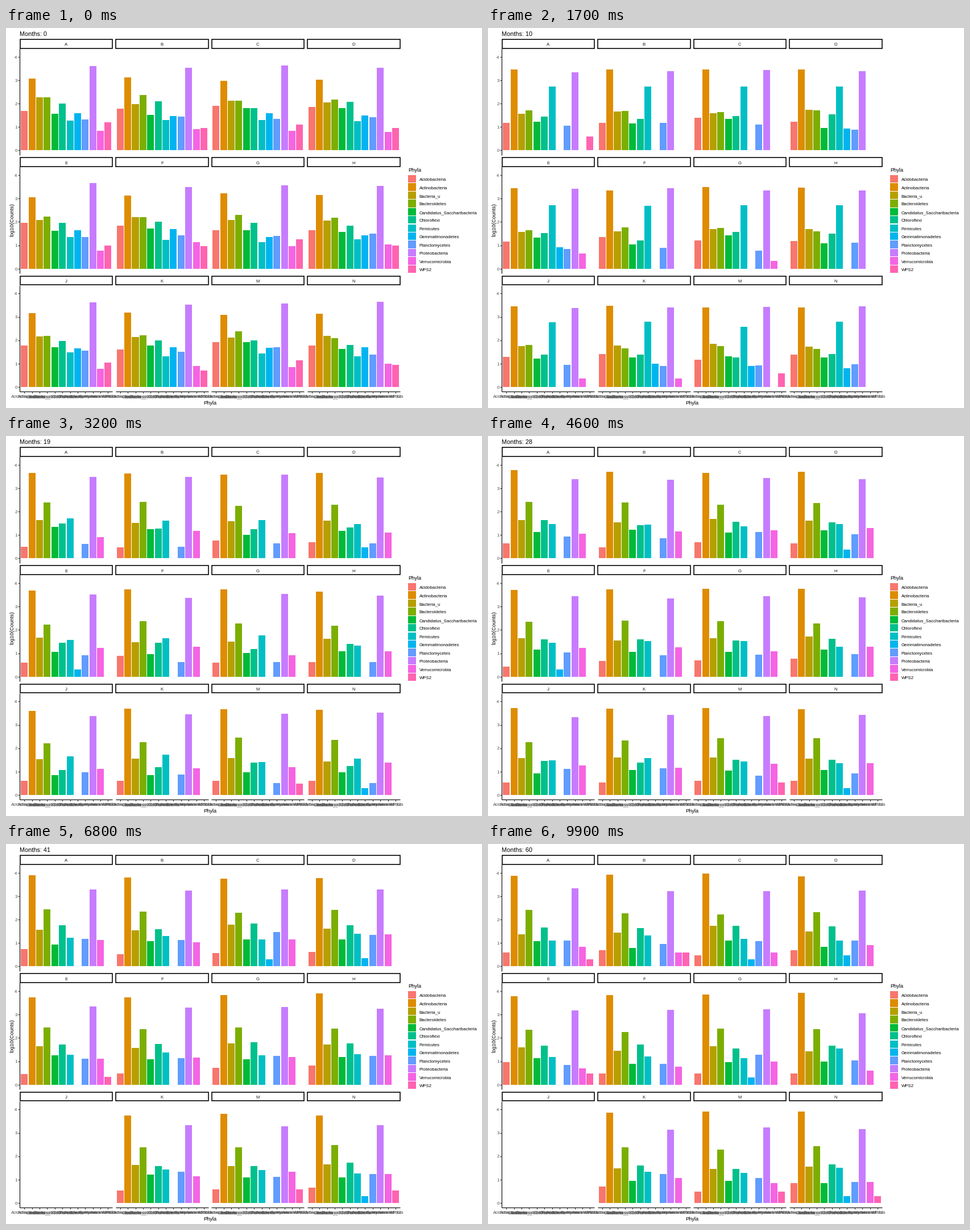
A matplotlib script for the animation above (10 s loop, 837x669 px).

```python
import matplotlib.pyplot as plt
import numpy as np
from matplotlib.animation import FuncAnimation
from matplotlib.patches import Rectangle

W, H, DPI = 837, 669, 64
FRAMES, LAST_MONTH = 100, 60
PANELS = "ABCDEFGHJKMN"
MONTHS = (0, 10, 19, 36, 60)

# Phylum: colour, then its typical log10 count at each of MONTHS
PHYLA = {
    "Acidobacteria": ("#F8766D", 1.75, 1.24, 0.60, 0.55, 0.58),
    "Actinobacteria": ("#DE8C00", 3.09, 3.45, 3.68, 3.78, 3.85),
    "Bacteria_u": ("#B79F00", 2.12, 1.65, 1.55, 1.70, 1.55),
    "Bacteroidetes": ("#7CAE00", 2.20, 1.68, 2.33, 2.40, 2.33),
    "Candidatus_Saccharibacteria": ("#00BA38", 1.72, 1.22, 1.09, 1.12, 0.96),
    "Chloroflexi": ("#00C08B", 1.99, 1.38, 1.30, 1.77, 1.66),
    "Firmicutes": ("#00BFC4", 1.35, 2.75, 1.57, 1.30, 1.35),
    "Gemmatimonadetes": ("#00B4F0", 1.56, 0.95, 0.15, 0.00, 0.05),
    "Planctomycetes": ("#619CFF", 1.50, 0.95, 0.64, 1.34, 1.10),
    "Proteobacteria": ("#C77CFF", 3.58, 3.37, 3.49, 3.34, 3.20),
    "Verrucomicrobia": ("#F564E3", 0.83, 0.20, 1.18, 1.27, 0.75),
    "WPS2": ("#FF64B0", 0.98, 0.50, 0.10, 0.15, 0.10),
}
NAMES = list(PHYLA)
COLORS = [p[0] for p in PHYLA.values()]


def sample_counts():
    """log10 of whole counts, indexed by month, panel, phylum; nan where absent."""
    rng = np.random.default_rng(4)
    typical = np.array([p[1:] for p in PHYLA.values()]).T[:, None, :]
    spread = 0.28 / (1 + typical)
    noise = rng.standard_normal((len(MONTHS), len(PANELS), len(PHYLA))).clip(-2, 2)
    counts = np.round(10 ** (typical + spread * noise))
    logs = np.where(counts < 2, np.nan, np.log10(counts.clip(1)))
    logs[-1, PANELS.index("J")] = np.nan  # panel J was not sampled to the end
    return logs


KEYS = np.round(np.array(MONTHS) * (FRAMES - 1) / LAST_MONTH).astype(int)
STATES = sample_counts()


def heights(i):
    """Linear between samples; a bar missing at either end of a span is hidden."""
    k = np.searchsorted(KEYS, i, side="right") - 1
    now = STATES[k]
    if i > KEYS[k]:
        t = (i - KEYS[k]) / (KEYS[k + 1] - KEYS[k])
        now = now + (STATES[k + 1] - now) * t
    return np.nan_to_num(now)


# Layout in pixels, y pointing down
LEFT, COL, PANEL_W = 24.2, 168.5, 163.3
BASE, ROW, UNIT = 215.4, 208.3, 41.15
ABOVE, BELOW, STRIP = 179.4, 8.4, 16
STEP = PANEL_W / 12.2
BAR = 0.9 * STEP
SMALL, MEDIUM, LARGE = 7.8, 9.2, 10.9
GREY, TICK = "#4D4D4D", "#333333"

plt.rcParams["font.family"] = "Liberation Sans"
fig = plt.figure(figsize=(W / DPI, H / DPI), dpi=DPI, facecolor="white")
ax = fig.add_axes([0, 0, 1, 1])
ax.set_xlim(0, W)
ax.set_ylim(H, 0)
ax.axis("off")


def pt(px):
    return px * 72 / DPI


def label(x, y, s, size=SMALL, color="black", ha="left", va="baseline", **kw):
    return ax.text(x, y, s, fontsize=pt(size), color=color, ha=ha, va=va, **kw)


def line(x0, y0, x1, y1, color="black"):
    ax.plot([x0, x1], [y0, y1], color=color, lw=pt(1.1), solid_capstyle="butt")


def box(x, y, w, h, **kw):
    return ax.add_patch(Rectangle((x, y), w, h, **kw))


def block(x, y, w, h, color):
    return box(x, y, w, h, fc=color, ec="none", antialiased=False)


def draw_panel(n):
    row, col = divmod(n, 4)
    x, base = LEFT + col * COL, BASE + row * ROW
    top, bottom = base - ABOVE, base + BELOW
    box(x + 0.5, top - STRIP, PANEL_W - 0.5, STRIP - 0.5,
        fc="white", ec="black", lw=pt(1.6))
    label(x + PANEL_W / 2, top - 4.6, PANELS[n], color="#1A1A1A", ha="center")
    if col == 0:
        line(x, top, x, bottom)
        for v in range(5):
            y = base - v * UNIT
            line(x - 3, y, x, y, TICK)
            label(x - 4.5, y + 2.8, str(v), color=GREY, ha="right")
    centers = x + STEP * (0.6 + np.arange(len(NAMES)))
    if row == 2:
        line(x, bottom, x + PANEL_W, bottom)
        for cx, name in zip(centers, NAMES):
            line(cx, bottom, cx, bottom + 3, TICK)
            label(cx, 651.3, name, color=GREY, ha="center")
    return [block(cx - BAR / 2, base, BAR, 0, c) for cx, c in zip(centers, COLORS)]


bars = [draw_panel(n) for n in range(len(PANELS))]

title = label(24, 14, "", LARGE)
label(358.5, 663, "Phyla", MEDIUM, ha="center")
label(10.5, 338, "log10(Counts)", MEDIUM, ha="center", va="center", rotation=90)

label(707, 253, "Phyla", MEDIUM)
for j, (name, c) in enumerate(zip(NAMES, COLORS)):
    y = 265.6 + 14.45 * j
    block(707.2, y - 6.8, 13.4, 13.4, c)
    label(726.5, y + 3.5, name)


def update(i):
    title.set_text(f"Months: {round(LAST_MONTH * i / (FRAMES - 1))}")
    for panel, row in zip(bars, heights(i)):
        for bar, h in zip(panel, row):
            bar.set_height(-h * UNIT)
            bar.set_visible(h > 0)
    return [title] + sum(bars, [])


anim = FuncAnimation(fig, update, frames=FRAMES, interval=1000 * 10 / FRAMES,
                     repeat=True, repeat_delay=0)
plt.show()
```
